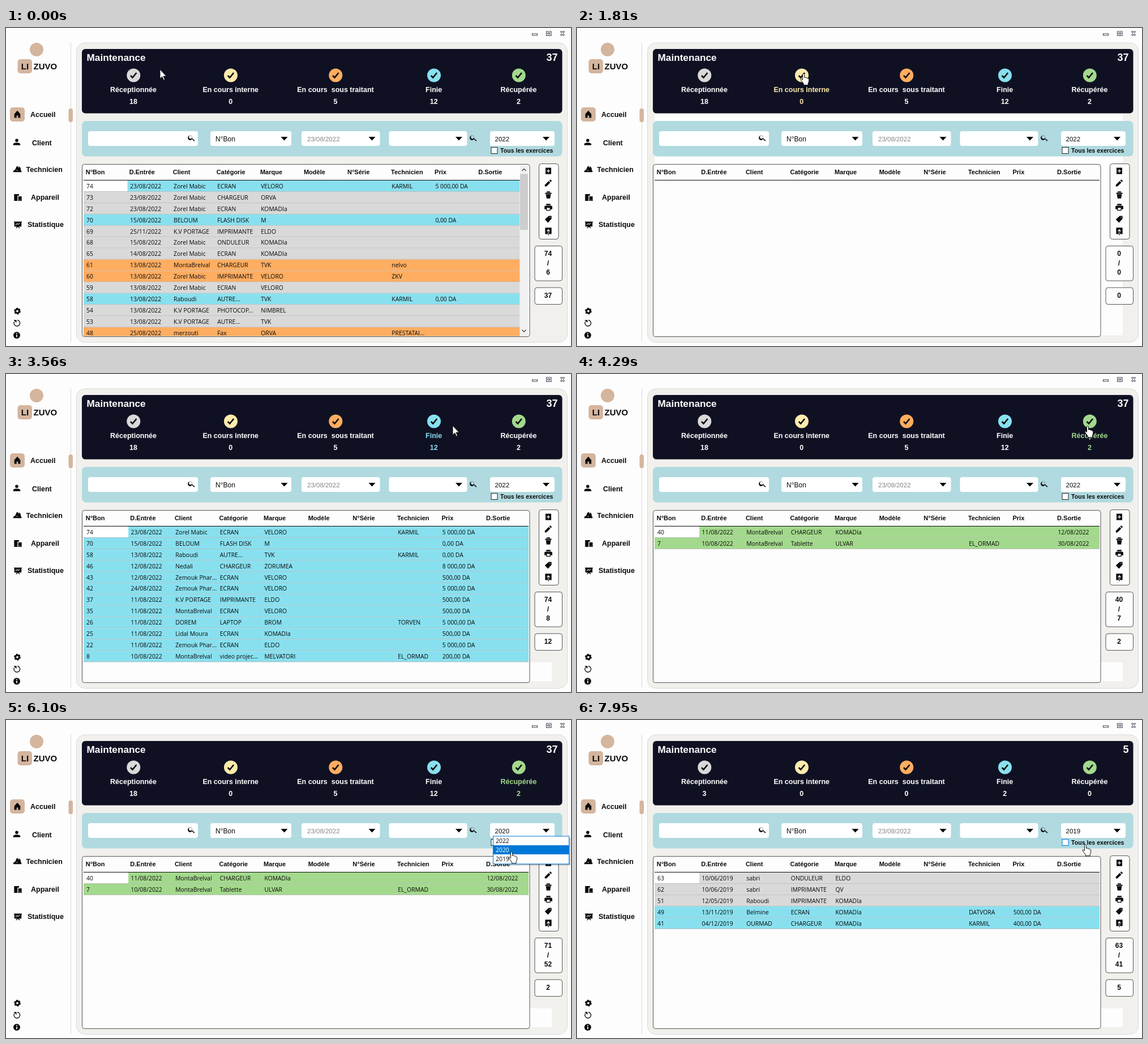
These frames come from a looping animation (998x561 px, 8 s). An HTML page:

```html
<!DOCTYPE html>
<html lang="fr">
<head>
<meta charset="utf-8">
<title>Maintenance</title>
<style>
html, body { margin: 0; width: 100%; height: 100%; overflow: hidden; background: #fdfdfd; }
svg { display: block; width: 998px; height: 561px; }
text { font-family: "Liberation Sans", Arial, sans-serif; white-space: pre; }
.b { font-weight: bold; }
.cell { font: 10.4px "Open Sans", "Noto Sans", sans-serif; }
</style>
</head>
<body>
<svg id="stage" viewBox="0 0 998 561"></svg>
<script>
const LOOP = 8000;
const NAVY = '#0f1123', PEACH = '#d4b59e', INK = '#0a0a0a', PAPER = '#fdfdfd', BLUE = '#0078d7';
const COLORS = { g: '#d9d9d9', y: '#ffebad', o: '#ffad60', b: '#88e0ef', v: '#a3d98c' };
const STATUS = [
  ['g', 225, 'Réceptionnée'], ['y', 396.7, 'En cours interne'],
  ['o', 582, 'En cours  sous traitant'], ['b', 755.7, 'Finie'], ['v', 905.5, 'Récupérée']
];
const COUNTS = { 2022: [18, 0, 5, 12, 2], 2020: [3, 1, 0, 2, 0], 2019: [3, 0, 0, 2, 0] };
const HEADS = ['N°Bon', 'D.Entrée', 'Client', 'Catégorie', 'Marque', 'Modèle', 'N°Série', 'Technicien', 'Prix', 'D.Sortie'];

// colour|number|date in|client|category|brand|technician|price|date out
const parse = s => s.trim().split('\n').map(line => line.split('|'));
const ROWS = {
  2022: parse(`
b|74|23/08/2022|Zorel Mabic|ECRAN|VELORO|KARMIL|5 000,00 DA
g|73|23/08/2022|Zorel Mabic|CHARGEUR|ORVA
g|72|23/08/2022|Zorel Mabic|ECRAN|KOMADIa
b|70|15/08/2022|BELOUM|FLASH DISK|M||0,00 DA
g|69|25/11/2022|K.V PORTAGE|IMPRIMANTE|ELDO
g|68|15/08/2022|Zorel Mabic|ONDULEUR|KOMADIa
g|65|14/08/2022|Zorel Mabic|ECRAN|KOMADIa
o|61|13/08/2022|MontaBrelval|CHARGEUR|TVK|nelvo
o|60|13/08/2022|Zorel Mabic|IMPRIMANTE|VELORO|ZKV
g|59|13/08/2022|Zorel Mabic|ECRAN|VELORO
b|58|13/08/2022|Raboudi|AUTRE...|TVK|KARMIL|0,00 DA
g|54|13/08/2022|K.V PORTAGE|PHOTOCOP...|NIMBREL
g|53|13/08/2022|K.V PORTAGE|AUTRE...|TVK
o|48|25/08/2022|merzouti|Fax|ORVA|PRESTATAI...
g|47|12/08/2022|Zorel Mabic|ECRAN|ELDO
b|46|12/08/2022|Nedali|CHARGEUR|ZORUMEA||8 000,00 DA
g|45|12/08/2022|K.V PORTAGE|ONDULEUR|KOMADIa
g|44|12/08/2022|Raboudi|ECRAN|VELORO
b|43|12/08/2022|Zemouk Phar...|ECRAN|VELORO||500,00 DA
b|42|24/08/2022|Zemouk Phar...|ECRAN|VELORO||5 000,00 DA
v|40|11/08/2022|MontaBrelval|CHARGEUR|KOMADIa|||12/08/2022
g|39|11/08/2022|Zorel Mabic|IMPRIMANTE|ELDO
b|37|11/08/2022|K.V PORTAGE|IMPRIMANTE|ELDO||500,00 DA
g|36|11/08/2022|MontaBrelval|ECRAN|TVK
b|35|11/08/2022|MontaBrelval|ECRAN|VELORO||500,00 DA
o|33|11/08/2022|K.V PORTAGE|ECRAN|VELORO|ZKV
g|31|11/08/2022|Zorel Mabic|CHARGEUR|ORVA
b|26|11/08/2022|DOREM|LAPTOP|BROM|TORVEN|5 000,00 DA
b|25|11/08/2022|Lidal Moura|ECRAN|KOMADIa||500,00 DA
b|22|11/08/2022|Zemouk Phar...|ECRAN|ELDO||5 000,00 DA
o|19|11/08/2022|MontaBrelval|CHARGEUR|TVK|nelvo
b|8|10/08/2022|MontaBrelval|video projec...|MELVATORI|EL_ORMAD|200,00 DA
v|7|10/08/2022|MontaBrelval|Tablette|ULVAR|EL_ORMAD||30/08/2022`),
  2020: parse(`
y|71|09/07/2020|K.V PORTAGE|IMPRIMANTE|ELDO|KARMIL
g|64|14/07/2020|K.V PORTAGE|IMPRIMANTE|KOMADIa
b|57|15/06/2020|ELMA NADOUR|PHOTOCOPI...|TRIVOLK||3 000,00 DA
b|56|15/06/2020|Zorel Mabic|AUTRE...|TVK||50 000,00 DA
g|55|15/06/2020|Zorel Mabic|ECRAN|KOMADIa
g|52|16/06/2020|K.V PORTAGE|ECRAN|KOMADIa`),
  2019: parse(`
g|63|10/06/2019|sabri|ONDULEUR|ELDO
g|62|10/06/2019|sabri|IMPRIMANTE|QV
g|51|12/05/2019|Raboudi|IMPRIMANTE|KOMADIa
b|49|13/11/2019|Belmine|ECRAN|KOMADIa|DATVORA|500,00 DA
b|41|04/12/2019|OURMAD|CHARGEUR|KOMADIa|KARMIL|400,00 DA`)
};

// Each scene overrides parts of the one before it.
const SCENES = [
  { t: 0, data: 2022, pick: '', year: 2022, first: 74, last: 6, total: 37, open: 0, stale: 0 },
  { t: 810, pick: 'g', first: 73, last: 6, total: 18 },
  { t: 1805, pick: 'y', first: 0, last: 0, total: 0, stale: 151 },
  { t: 2690, pick: 'o', first: 61, last: 19, total: 5, stale: 476 },
  { t: 3555, pick: 'b', first: 74, last: 8, total: 12, stale: 508.5 },
  { t: 4280, pick: 'v', first: 40, last: 7, total: 2 },
  { t: 5440, open: 1 },
  { t: 6095, year: 2020, first: 71, last: 52 },
  { t: 6240, data: 2020, pick: '', total: 6, open: 0 },
  { t: 6800, open: 1 },
  { t: 7366, data: 2019, year: 2019, first: 63, last: 41, total: 5, open: 0 }
];

// Pointer moves: first step, last step, number of steps, destination.
const MOVES = [
  [120, 540, 4, 223, 80], [950, 1660, 6, 400, 80], [1960, 2110, 2, 574, 80], [2390, 2390, 1, 575, 82],
  [2830, 3260, 4, 753, 84], [3555, 3555, 1, 789, 91], [3704, 4137, 4, 903, 80], [4280, 4280, 1, 902, 91],
  [4426, 4570, 2, 626, 92], [4720, 5298, 5, 953, 195], [5585, 5680, 2, 893, 233], [5800, 5800, 1, 893, 232],
  [6380, 6660, 3, 948, 196], [6930, 7065, 2, 887, 236], [7220, 7220, 1, 884, 246], [7366, 7945, 5, 898, 219]
];

const text = (x, y, s, size, fill = INK, cls = 'b', anchor = 'start') =>
  `<text x="${x}" y="${y}" class="${cls}" font-size="${size}" fill="${fill}" text-anchor="${anchor}">${s}</text>`;
const mid = (x, y, s, size, fill) => text(x, y, s, size, fill, 'b', 'middle');
const box = (x, y, x2, y2, r, fill, extra = '') =>
  `<rect x="${x}" y="${y}" width="${x2 - x}" height="${y2 - y}" rx="${r}" fill="${fill}" ${extra}/>`;
const line = (d, stroke = INK, w = 1) => `<path d="${d}" fill="none" stroke="${stroke}" stroke-width="${w}"/>`;
const icon = (x, y, size, d) =>
  `<path transform="translate(${x - size / 2} ${y - size / 2}) scale(${size / 24})" d="${d}" fill="${INK}" fill-rule="evenodd"/>`;
const group = id => `<g id="${id}"></g>`;
const card = (x, y, x2, y2) => box(x, y, x2, y2, 4, PAPER, 'stroke="#444" stroke-width=".9"');

const SEARCH = 'M15.5 14h-.8l-.3-.3A6.5 6.5 0 1 0 14 14.7v.8l5.5 5.5 2-2zM9.5 14a4.5 4.5 0 1 1 0-9 4.5 4.5 0 0 1 0 9z';
const PERSON = 'M12 12a4.5 4.5 0 1 0 0-9 4.5 4.5 0 0 0 0 9zM12 14c-3 0-10 1-10 4.500V21h20v-2.500C22 15 15 14 12 14z';
const HOME = 'M10 21v-6h4v6h6v-10L12 2 4 11v10z';
const HELMET = 'M1 20q0-5 5-6l4-9 4-1 1 5 2-4q5 3 4 10l2 1v4zM9 14l2 2 3-1z';
const DEVICES = 'M2 3h13v4h-4v14H2zM13 9h9v12h-9zM16 18v1h3v-1z';
const BOARD = 'M1 3h22v3h-1v11h-7l3 5h-2l-4-4-4 4H6l3-5H2V6H1zM6 13l4-3 3 2 5-4-1-1-4 3-3-2-5 4z';
const PLUS = 'M4 3h16v18H4zM11 7v4H7v2h4v4h2v-4h4v-2h-4V7z';
const PENCIL = 'M2 17.500V22h4.500L17.500 11 13 6.500zM21 7.500q1-1 0-2L18.500 3q-1-1-2 0l-2 2L19 9.500z';
const BIN = 'M3 6h18v3H3zM5 10h14l-2 12H7zM8 2h8l2 3H6z';
const PRINTER = 'M6 3h12v4H6zM4 8h16q3 0 3 3v7h-5v4H6v-4H1v-7q0-3 3-3zM8 14v6h8v-6z';
const TAG = 'M13 3h8v8L11 22 2 13zM16 6v2h2V6z';
const UPLOAD = 'M3 2h18v18h-7v-8h3l-5-6-5 6h3v8H3zM11 11h2v12h-2z';

function gear(x, y) {
  return `<g fill="none" stroke="${INK}"><circle cx="${x}" cy="${y}" r="3.4" stroke-width="3"/>` +
    `<circle cx="${x}" cy="${y}" r="5" stroke-width="2" stroke-dasharray="2.6 2.636"/></g>`;
}

function sidebar() {
  const items = [[43, 157, 'Accueil'], [46, 206.500, 'Client'], [35.500, 254, 'Technicien'], [44, 303, 'Appareil'], [38, 351, 'Statistique']];
  return line('M114.500 26V554', '#d6d6d6') + box(110.500, 142, 118, 166, 3.500, PEACH) +
    `<circle cx="54" cy="38" r="12" fill="${PEACH}"/>` +
    box(20.500, 55, 46, 80, 5, PEACH) + mid(33.500, 73, 'LI', 15) + text(48.500, 73, 'ZUVO', 15) +
    box(7, 140, 33, 165, 5, PEACH) +
    icon(20, 152.500, 16, HOME) + icon(19, 201, 15, PERSON) + icon(20, 249, 16, HELMET) +
    icon(21, 299, 16, DEVICES) + icon(21, 347, 15, BOARD) +
    items.map(([x, y, s]) => text(x, y, s, 12.500)).join('') +
    gear(20, 499.500) +
    line('M15 517.500A5.300 5.300 0 1 0 20 515.300', INK, 1.300) + `<path d="M13.500 515h5v5z"/>` +
    `<circle cx="19" cy="542" r="6" fill="${INK}"/>` + line('M19 541v4.500M19 538v1.800', '#fff', 1.700);
}

function frame() {
  return line('M929.500 10h9v3h-9z', '#445', 1.100) + line('M954.500 6h8.500v7.500h-8.500zM957 8.500h3.500v2.500h-3.500z', '#445', 1.100) +
    line('M979.500 6h2.500l1 2 1-2h2.500l-2 3.500 2 3.500h-2.500l-1-2-1 2h-2.500l2-3.500z', '#445') +
    box(124.500, 26, 991.500, 554.500, 15, '#f1f0ec', 'stroke="#dadada"');
}

function filters() {
  const fields = [[145, 339], [361, 504], [522, 660.500], [676.500, 814.500], [855, 969]];
  return box(134, 164, 982.500, 226.500, 7, '#b0dae0') +
    fields.map(([a, b]) => box(a, 182, b, 208, 4, '#fff')).join('') +
    [491.500, 646.500, 800, 954].map(x => `<path d="M${x - 6} 192h12l-6 6.500z"/>`).join('') +
    icon(327.500, 194, 15, SEARCH) + icon(825.500, 194, 15, SEARCH) +
    text(370, 199.500, 'N°Bon', 12, INK, '') + text(532, 199.500, '23/08/2022', 11.500, '#858585', '') +
    group('year') + text(873, 220, 'Tous les exercices', 10.600);
}

function sidePanels() {
  return card(941.500, 239.500, 976, 372.500) + card(934, 384.500, 982.500, 446) + card(934, 458, 982.500, 487.500) +
    [PLUS, PENCIL, BIN, PRINTER, TAG, UPLOAD].map((d, i) => icon(958, 252 + i * 21.300, 15, d)).join('') + group('totals');
}

const stage = document.getElementById('stage');
stage.innerHTML = `<defs><clipPath id="clip">${box(136, 242, 924, 543.500, 3, '#000')}</clipPath></defs>` +
  box(0, 0, 998, 561, 0, PAPER) + sidebar() + frame() + group('stale') +
  box(134, 37, 982.500, 150.500, 6, NAVY) + text(142.500, 58, 'Maintenance', 17.200, '#fff') + group('status') +
  filters() + card(134.500, 240.500, 925, 544.500) + `<g id="table" clip-path="url(#clip)"></g>` +
  sidePanels() + group('list') + group('pointer');

const cache = {};
function put(id, html) {
  if (cache[id] !== html) document.getElementById(id).innerHTML = cache[id] = html;
}

function drawStatus(s) {
  const marks = STATUS.map(([key, x, label], i) => {
    const ink = s.pick === key ? COLORS[key] : '#fff';
    return `<circle cx="${x + .3}" cy="83.500" r="12" fill="${COLORS[key]}"/>` +
      line(`M${x - 5} 84l3.500 3.500 7-8.500`, INK, 2.600) +
      mid(x, 113, label, 12.500, ink) + mid(x, 134, COUNTS[s.data][i], 12.500, ink);
  });
  const sum = COUNTS[s.data].reduce((a, b) => a + b);
  return marks.join('') + text(974.500, 58, sum, 18, '#fff', 'b', 'end');
}

function scrollBar(total) {
  return box(908, 242, 922, 544, 0, '#f0f0f0') + box(908, 257.500, 922, 257.500 + 3650 / total, 0, '#cdcdcd') +
    line('M911.500 252l3.500-3.500 3.500 3.500M911.500 532.500l3.500 3.500 3.500-3.500', '#505050', 1.500);
}

function drawTable(s) {
  const rows = ROWS[s.data].filter(r => !s.pick || r[0] === s.pick).slice(0, 14);
  const scroll = s.total > 13, right = scroll ? 907.500 : 923;
  const pitch = scroll ? 77.050 : 78.600;
  const col = i => 141 + i * pitch;
  const body = rows.map((r, k) => {
    const y = 269 + k * 19.930;
    const cells = [r[1], r[2], r[3], r[4], r[5], '', '', r[6], r[7], r[8]];
    return box(137, y, right, y + 19.930, 0, COLORS[r[0]]) + box(137, y + 19, right, y + 19.930, 0, '#bcbcbc') +
      (k ? '' : box(137, y, 137.500 + pitch, y + 19, 0, '#fff')) +
      cells.map((c, i) => c ? text(col(i) + 1, y + 13.800, c, 10.400, INK, 'cell') : '').join('');
  });
  return body.join('') + HEADS.map((h, i) => text(col(i) - .3, 258, h, 11)).join('') +
    line(`M137 268.500H${right}`, INK, 1.200) + (scroll ? scrollBar(s.total) : '');
}

function drawList(s, p) {
  if (!s.open) return '';
  const years = [2022, 2020, 2019];
  const under = Math.floor((p.y - 205) / 16.100);
  const active = under >= 0 && under < 3 ? under : years.indexOf(s.year);
  return box(863, 208, 997, 256.500, 0, '#000', 'opacity=".25"') +
    box(860.500, 205, 994.500, 254, 0, '#fff', `stroke="${BLUE}"`) +
    years.map((v, i) => (i === active ? box(861, 221 + (i - 1) * 16, 994, 237 + (i - 1) * 16, 0, BLUE) : '') +
      text(865, 216.500 + i * 16.300, v, 10, i === active ? '#fff' : INK, 'cell')).join('');
}

function pointerAt(t) {
  let x = 272, y = 73;
  for (const [start, end, n, toX, toY] of MOVES) {
    if (t < start) break;
    const gap = n > 1 ? (end - start) / (n - 1) : 1;
    const f = Math.min(n, Math.floor((t - start) / gap + 1e-6) + 1) / n;
    x += (toX - x) * f;
    y += (toY - y) * f;
  }
  return { x, y };
}

const overCheck = p => p.x > 856 && p.x < 968 && p.y > 210 && p.y < 222;
const isHot = (p, s) => overCheck(p) || STATUS.some(([, x]) => Math.hypot(p.x - x, p.y - 83.500) < 13) ||
  (p.x > 855 && p.x < 969 && p.y > 182 && p.y < (s.open ? 254 : 208));

function drawPointer(p, s) {
  const d = isHot(p, s)
    ? 'M-1.500 1.500q1.500-2 3 0v6l1-.5q2-.5 2.300 1 2-.7 2.500 1 2-.3 2.400 1.200v4l-1.500 3.500v3h-8v-2.500l-5-6.500q-.8-2 1-2l2.300 2z'
    : 'M0 0v16.500l3.800-3.600 2.600 6 2.200-1-2.600-5.800h5.300z';
  return `<path transform="translate(${p.x.toFixed(1)} ${p.y.toFixed(1)})" d="${d}" fill="#fff" stroke="#000" stroke-width=".9"/>`;
}

function drawStale(from) {
  if (!from) return '';
  return from < 200 ? box(137, from, 964, 542, 0, PAPER) : box(925, from, 964, 542, 0, PAPER);
}

function render(t) {
  const s = Object.assign({}, ...SCENES.filter(scene => scene.t <= t));
  const p = pointerAt(t);
  const edge = overCheck(p) && !s.open ? BLUE : '#222';
  put('stale', drawStale(s.stale));
  put('status', drawStatus(s));
  put('table', drawTable(s));
  put('year', text(863.500, 199.500, s.year, 11.500, INK, '') +
    box(857, 210.500, 868, 221.500, 0, '#fff', `stroke="${edge}"`));
  put('totals', [[402, s.first], [418.500, '/'], [435, s.last], [476, s.total]].map(([y, v]) => mid(957.500, y, v, 12)).join(''));
  put('list', drawList(s, p));
  put('pointer', drawPointer(p, s));
}

const begin = performance.now();
function tick() {
  render((performance.now() - begin) % LOOP);
  requestAnimationFrame(tick);
}
tick();
</script>
</body>
</html>
```
